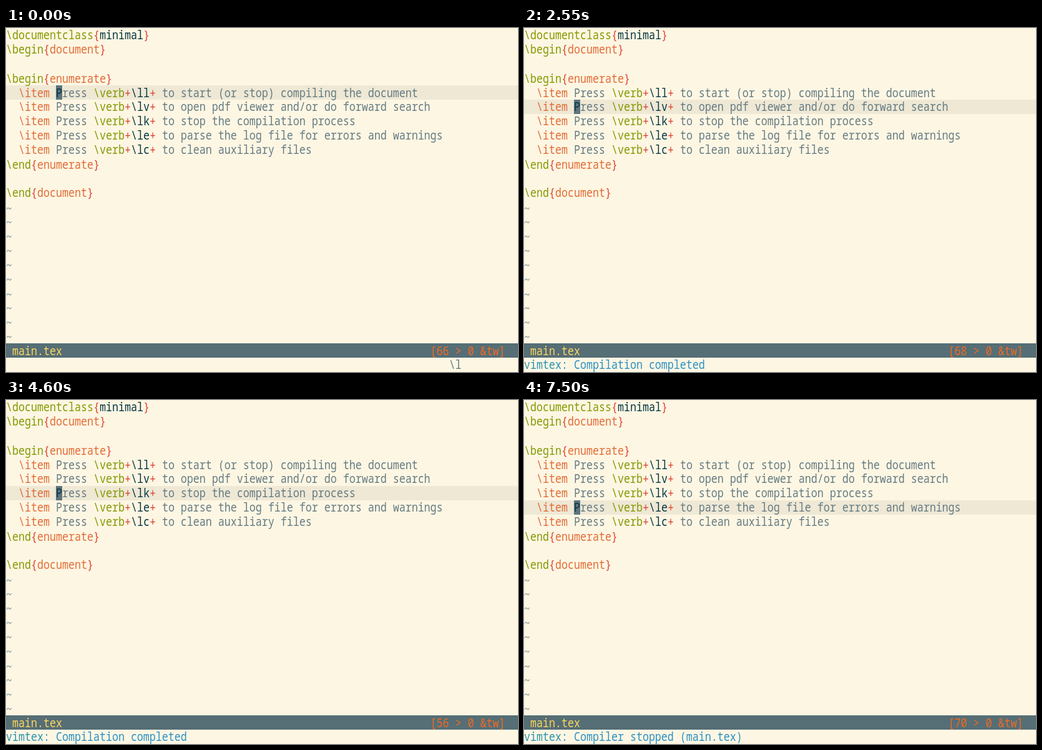
Write an HTML page that moves like this. It is 820 px wide and 552 px high and loops after 8 s.

```html
<!DOCTYPE html>
<html>
<head>
<meta charset="utf-8">
<style>
html, body { margin: 0; width: 100%; height: 100%; overflow: hidden; background: #fdf6e3; }
#stage { position: absolute; left: 0; top: 0; width: 820px; height: 552px; overflow: hidden; }
#stage div { position: absolute; height: 23px; }
/* tall 10 x 23 px character cells */
pre {
  position: absolute; left: 0; top: -1px; margin: 0; width: 820px; color: #657b83;
  font: 16.6667px/19.16667px "Noto Sans Mono", "DejaVu Sans Mono", monospace;
  font-variant-ligatures: none; transform: scaleY(1.2); transform-origin: 0 0;
}
.green { color: #859900; }
.orange { color: #e36c36; }
.red { color: #e0402f; }
.dark { color: #073642; }
.tilde { color: #7f9499; position: relative; top: 1.5px; }
.yellow { color: #ffd75f; }
.warn { color: #f26a22; }
.cyan { color: #2a93b0; }
.blue { color: #2b8fc4; }
.select, .select span { color: #fdf6e3; }
.select .cursor { color: #073642; }
#bar { left: 0; top: 506px; width: 820px; background: #566e75; }
#line { left: 0; }
#cursor { left: 80px; width: 10px; }
</style>
</head>
<body>
<div id="stage">
  <div id="bar"></div>
  <div id="line"></div>
  <div id="cursor"></div>
  <pre id="text"></pre>
</div>
<script>
const $ = id => document.getElementById(id);
const span = (cls, s) => `<span class="${cls}">${s.replace(/&/g, "&amp;").replace(/>/g, "&gt;")}</span>`;

const item = (key, words) => `  \\item Press \\verb+\\${key}+ ${words}`;
const source = [
  "\\documentclass{minimal}",
  "\\begin{document}",
  "",
  "\\begin{enumerate}",
  item("ll", "to start (or stop) compiling the document"),
  item("lv", "to open pdf viewer and/or do forward search"),
  item("lk", "to stop the compilation process"),
  item("le", "to parse the log file for errors and warnings"),
  item("lc", "to clean auxiliary files"),
  "\\end{enumerate}",
  "",
  "\\end{document}"
];

function highlight(s) {
  return s.replace(/\\item|\\l\w\b|\\\w+|[{}+]|minimal|document(?=})|enumerate/g, t => {
    if (/^[{}+]$/.test(t)) return span("red", t);
    if (t === "minimal" || /^\\l\w$/.test(t)) return span("dark", t);
    return span(t[0] === "\\" && t !== "\\item" ? "green" : "orange", t);
  });
}

const lines = source.map(highlight);
while (lines.length < 22) lines.push(span("tilde", "~"));

const LOOP = 8000;

// value of the last [start, value] step reached at time t
const at = (steps, t) => steps.filter(s => s[0] <= t).pop()[1];

const rows = [[0, 4], [2550, 5], [4600, 6], [7500, 7]];
const messages = [
  [0, ""],
  [100, "Compiler started in continuous mode"],
  [650, "Compilation completed"],
  [6050, "Compiler stopped (main.tex)"]
];
const keys = [
  [0, "\\l"], [50, ""], [3200, "1"], [3350, ""],
  [5800, "\\"], [5850, "\\l"], [6000, ""]
];

let shown = "";

function draw(t) {
  const row = at(rows, t), msg = at(messages, t), key = at(keys, t);
  const visual = t >= 3150 && t < 3350;
  const state = [row, msg, key, visual].join("|");
  if (state === shown) return;
  shown = state;

  const { style } = $("line");
  const length = source[row].length;
  style.top = $("cursor").style.top = row * 23 + "px";
  style.width = (visual ? length * 10 : 820) + "px";
  style.background = visual ? "#93a1a1" : "#eee8d5";
  $("cursor").style.background = visual ? "#d33682" : "#5d747d";

  const out = lines.slice();
  out[row] = out[row].replace("Press", span("dark cursor", "P") + "ress");
  if (visual) out[row] = `<span class="select">${out[row]}</span>`;

  out.push(" " + span("yellow", "main.tex") + " ".repeat(59) +
    span("warn", `[${length} > 0 &tw]`));

  const prefix = msg && "vimtex: ";
  out.push(span("cyan", prefix) + span("blue", msg) +
    " ".repeat(71 - prefix.length - msg.length) + key);
  $("text").innerHTML = out.join("\n");
}

function tick() {
  draw(performance.now() % LOOP);
  requestAnimationFrame(tick);
}
tick();
</script>
</body>
</html>
```
